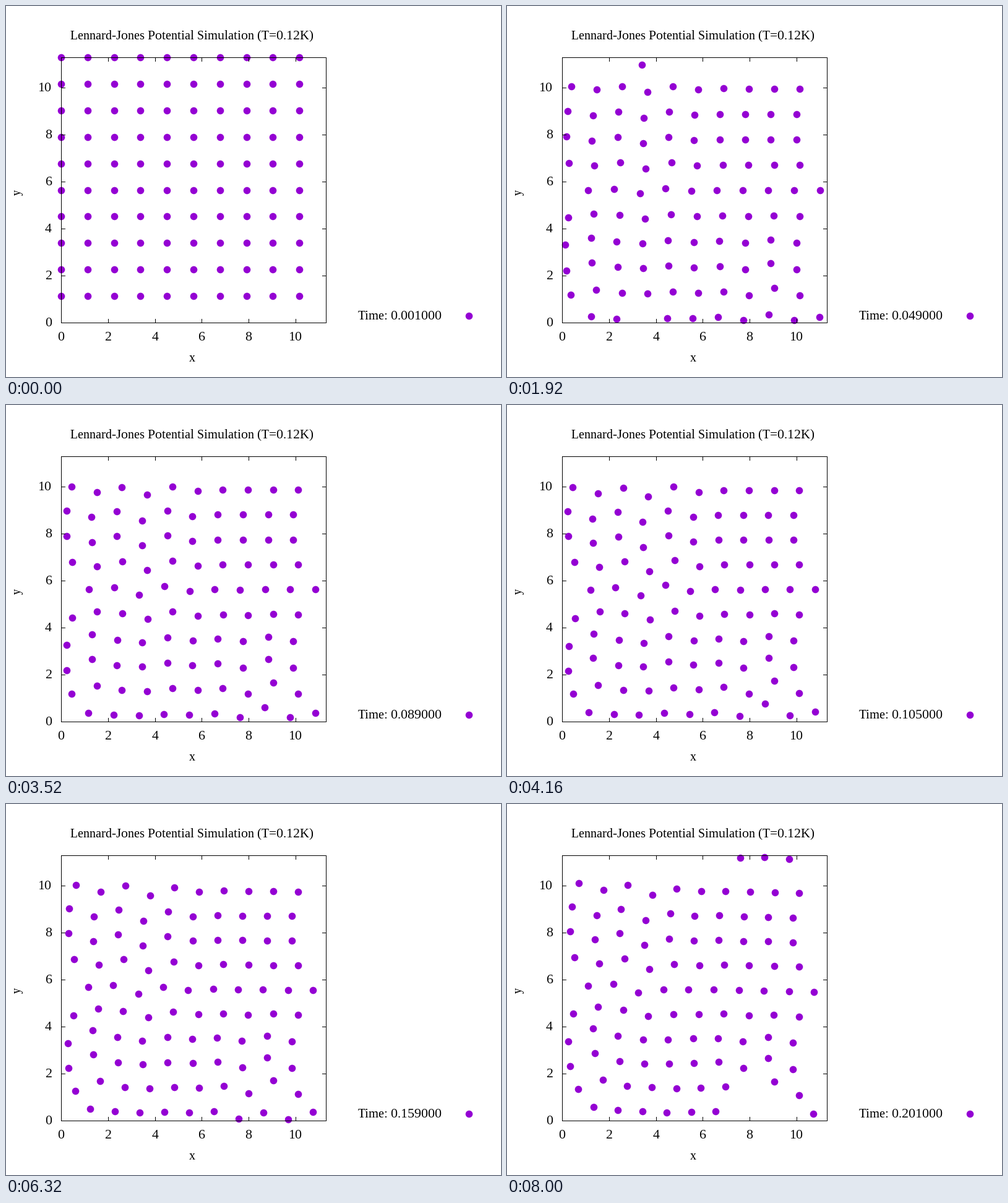
Animation of 800 by 600 pixels, one loop 8.08 s. Source, as a matplotlib script:

```python
import matplotlib.pyplot as plt
import numpy as np
from matplotlib.animation import FuncAnimation

# Whole-pixel letter spacing, as in plain bitmap plots
plt.rcParams.update({"font.family": "Liberation Serif", "toolbar": "None",
                     "text.hinting": "default", "text.hinting_factor": 1})

W, H, DPI = 800, 600, 100
PX = 72 / DPI                                # points per pixel
LEFT, RIGHT, TOP, BOTTOM = 89, 517, 83, 512  # plot box in pixels
BOX = 11.3                                   # box side in data units
N = 10                                       # particles per side
FRAMES, STEP_MS = 101, 80
VIOLET = "#9400D3"

# Rows count from the top. Two rows start one site further right, so their
# last particle wraps round to the left edge.
row, col = np.mgrid[0:N, 0:N].astype(float)
col[[4, 9]] += 1
site_x = LEFT + (RIGHT - LEFT) / N * col
site_y = TOP + (BOTTOM - TOP) / N * (row + 1)


def bump(size, r, r_width, c, c_width):
    return size * np.exp(-((row - r) / r_width) ** 2 - ((col - c) / c_width) ** 2)


def buckle(*args):
    """Neighbouring columns pushed up and down in turn."""
    return bump(*args) * np.where(col % 2, 1, -1)


# The lattice shrinks towards the middle, rows slip past each other
# and columns buckle in a few places.
settle_x = 14 - 2.6 * col + 9 * np.cos(np.pi * (0.8 * row - 0.2))
settle_y = (14 - 3.1 * row + buckle(11, 2, 5, 3, 1.6) + buckle(-15, 6.5, 2.3, 0.6, 1.2)
            + buckle(13, 8, 2, 8, 1.6) + buckle(9, 1.5, 3, 0, 0.8))

# Later the left side sways and the right side sinks through the lower edge
sway_x = (1 + 5 * np.cos(2 * np.pi * row / 9)) * (1 - col / 9)
drift_y = col - 5 + buckle(-8, 4, 5, 4, 0.7) + bump(24, 9, 0.5, 8, 1)
dip_y = bump(19, 9, 0.5, 3, 0.6)


def wrap(p, low, high):
    return low + (np.rint(p) - low) % (high - low)


def positions(i):
    settle = np.interp(i, (0, 24, 35, 52, 64), (0, 0.55, 0.7, 0.92, 1))
    sway = np.interp(i, (0, 24, 52, 64, 100), (0, 0.55, -0.35, 0, 1))
    drift = np.interp(i, (35, 52, 64, 100), (0, -0.25, 0, 1))
    dip = np.interp(i, (0, 24, 35), (0, 1, 0))
    x = wrap(site_x + settle * settle_x + sway * sway_x, LEFT, RIGHT)
    y = wrap(site_y + settle * settle_y + drift * drift_y + dip * dip_y, TOP, BOTTOM)
    if i > 92:
        x[8, 7] = np.nan                     # one particle is lost at the end
    return x.ravel(), y.ravel()


fig = plt.figure(figsize=(W / DPI, H / DPI), dpi=DPI, facecolor="white")
ax = fig.add_axes([0, 0, 1, 1])
ax.set(xlim=(0, W), ylim=(H, 0))
ax.axis("off")


def label(x, y, text, ha="center", va="baseline", **kw):
    return ax.text(x, y, text, ha=ha, va=va, fontsize=21.33 * PX, color="black", **kw)


def line(xs, ys):
    ax.plot(xs, ys, color="black", lw=PX, antialiased=False,
            solid_capstyle="projecting", zorder=5)


def dots(xs, ys):
    return ax.plot(xs, ys, "o", color=VIOLET, ms=11.6 * PX, mew=0,
                   antialiased=False, zorder=3)[0]


line([LEFT, RIGHT, RIGHT, LEFT, LEFT], [TOP, TOP, BOTTOM, BOTTOM, TOP])
for v in range(0, 11, 2):
    tx = round(LEFT + (RIGHT - LEFT) * v / BOX)
    ty = round(BOTTOM - (BOTTOM - TOP) * v / BOX)
    if v:
        line([tx, tx], [BOTTOM, BOTTOM - 6])
        line([tx, tx], [TOP, TOP + 6])
        line([LEFT, LEFT + 6], [ty, ty])
        line([RIGHT, RIGHT - 6], [ty, ty])
    label(tx, 541, str(v))
    label(74, ty + 6, str(v), ha="right")

label(301, 54, "Lennard-Jones Potential Simulation (T=0.12K)")
label(300.5, 575, "x")
label(18.5, 301, "y", va="center", rotation=90)
clock = label(569, 507, "", ha="left")
dots([748], [501])
particles = dots([], [])


def update(i):
    particles.set_data(*positions(i))
    clock.set_text(f"Time: {0.001 + 0.002 * i:.6f}")
    return particles, clock


anim = FuncAnimation(fig, update, frames=FRAMES, interval=STEP_MS,
                     init_func=lambda: update(0), repeat=True, repeat_delay=0,
                     blit=False)
plt.show()
```
